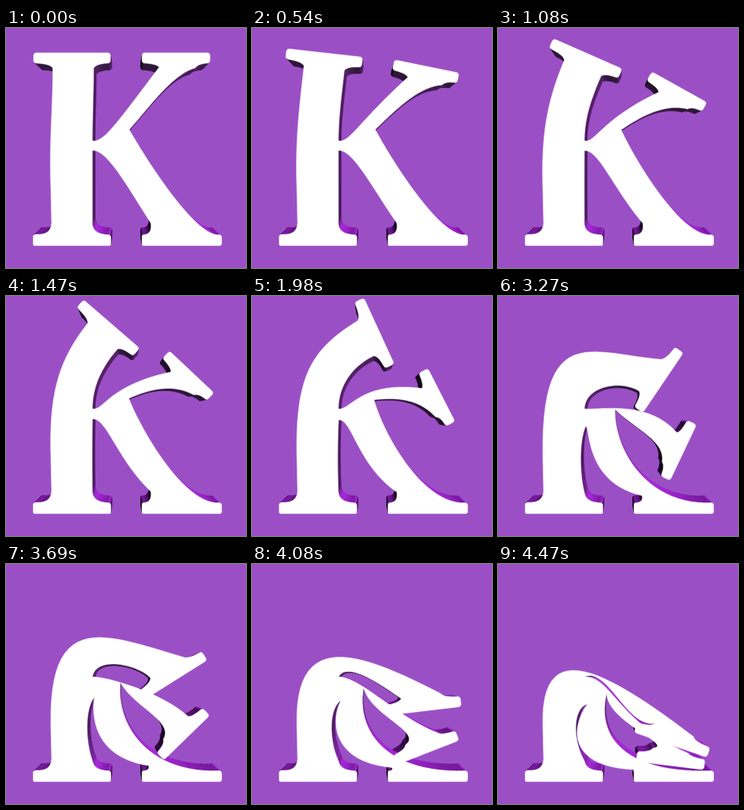
Recreate the animation shown at these times as an HTML page with a canvas. Size 300 px wide and 300 px high, loop 4.5 s.

```html
<!DOCTYPE html>
<html lang="en">
<head>
<meta charset="utf-8">
<title>Bending K</title>
<style>
html, body { margin: 0; width: 100%; height: 100%; overflow: hidden; background: #9b4fc5; }
canvas { display: block; width: 300px; height: 300px; }
</style>
</head>
<body>
<canvas id="stage" width="300" height="300"></canvas>
<script>
const ctx = document.getElementById('stage').getContext('2d');
const LOOP = 4500, STEP = 30;
const VANISH = [150, 150], DEPTH = 0.08;
const { PI, sin, cos, hypot, max, min, round } = Math;
const radians = degrees => degrees * PI / 180;

class Outline {
  constructor(x, y) { this.points = [[x, y]]; }
  line(...points) { this.points.push(...points); return this; }
  cubic(p1, p2, p3, parts = 26) {
    const p0 = this.points[this.points.length - 1];
    for (let i = 1; i <= parts; i++) {
      const t = i / parts, s = 1 - t;
      this.points.push([0, 1].map(c =>
        s * s * s * p0[c] + 3 * s * s * t * p1[c] + 3 * s * t * t * p2[c] + t * t * t * p3[c]));
    }
    return this;
  }
  quad(p1, p2) {
    const p0 = this.points[this.points.length - 1];
    const toward = p => [0, 1].map(c => p[c] + (p1[c] - p[c]) * 2 / 3);
    return this.cubic(toward(p0), toward(p2), p2, 7);
  }
  // Goes around a serif from its left neck to its right neck.
  serif(at, half, left, right) {
    return this.quad(at(left[0] - 3, 14), at(4 - half, 13))
      .quad(at(-half, 13), at(-half, 9)).line(at(-half, 4))
      .quad(at(-half, 0), at(4 - half, 0)).line(at(half - 4, 0))
      .quad(at(half, 0), at(half, 4)).line(at(half, 9))
      .quad(at(half, 13), at(half - 4, 13))
      .quad(at(right[0] + 3, 14), at(...right));
  }
}

// Local axes of a serif: origin at the middle of its outer edge.
function axes(x, y, degrees, scale) {
  const c = cos(radians(degrees)), s = sin(radians(degrees));
  return (u, v) => [x + c * u * scale - s * v, y + s * u * scale + c * v];
}

// The outline for a bend from 0 (upright) to 1 (folded over).
function letter(bend) {
  const b2 = bend ** 2, b3 = bend ** 3, fold = bend ** 8;

  const stemTurn = 199 * bend + 8 * sin(2 * PI * bend);
  const stem = axes(82.5 + 133 * (1 - (1 - bend) ** 2.5), 31 + 195 * bend ** 2.2,
    stemTurn, 1 - 0.07 * sin(PI * bend));
  const lead = bend ** 0.7;
  const arm = axes(212.5 + 2.5 * lead + 24 * sin(PI * lead), 31 + 221 * lead,
    150 * lead + 37 * lead ** 8, 1 - 0.13 * sin(PI * lead));
  const stemNeck = [[-24, 19], [27, 19]], armNeck = [[-21, 18], [24, 19]];

  const neck = stem(...stemNeck[0]);
  const lean = radians(stemTurn * (1 - 0.36 * bend));
  const pull = hypot(neck[0] - 56, neck[1] - 200) * (0.35 + 0.4 * b3);
  const rise = 60 + 50 * bend + 80 * sin(PI * bend ** 1.3) ** 2;

  const crotch = [154 - 18 * b2, 127 + 34 * b2];
  const spread = radians(140 * bend - 48);
  const foot = [181 - 12 * bend ** 6, 244 + 13 * b2];
  const waist = 108 - 15 * b2;

  return new Outline(34, 270)
    .line([34, 261]).quad([34, 258], [38, 258])
    .quad([56, 259], [57, 244]).line([56, 200])
    .cubic([54, 200 - rise], [neck[0] - pull * sin(lean), neck[1] + pull * cos(lean)], neck)
    .serif(stem, 48, ...stemNeck)
    .cubic(stem(27 + 32 * fold, 48 - 46 * fold), [108 + 30 * fold, 112 + 16 * fold], [108, 141])
    .cubic([122 + 20 * b3, 144 - 4 * b3], arm(143 * bend ** 4 - 72, 85 - 40 * b2), arm(...armNeck[0]))
    .serif(arm, 42.5, ...armNeck)
    .cubic(arm(-4, 26), [crotch[0] + 36 * cos(spread), crotch[1] + 36 * sin(spread)], crotch)
    .cubic([crotch[0] + 24 - 38 * bend, crotch[1] + 42 + 14 * bend], [238 - 78 * bend, 262], [267, 258.5])
    .quad([269.5, 259], [269.5, 262]).line([269.5, 270])
    .quad([269, 272], [267, 272]).line([172, 272])
    .quad([170, 272], [170, 270]).line([170, 261])
    .quad([170, 258.5], [min(172, foot[0]), 258.5])
    .quad([foot[0] + 2, 258], foot)
    .cubic([150 - 62 * bend, 195 + 58 * bend], [126 - 36 * b3, 152 + 53 * b3], [108 + 4 * b2, 153 + 22 * b2])
    .cubic([waist, 180], [waist, 220], [108, 246])
    .quad([110, 258], [128, 258.5])
    .quad([131, 259], [131, 262]).line([131, 270])
    .quad([131, 272], [129, 272]).line([36, 272])
    .quad([34, 272], [34, 270])
    .points;
}

const recede = p => [0, 1].map(c => p[c] + (VANISH[c] - p[c]) * DEPTH);

function paint(points, color, width) {
  ctx.beginPath();
  points.forEach(p => ctx.lineTo(p[0], p[1]));
  ctx.closePath();
  ctx.fillStyle = ctx.strokeStyle = color;
  ctx.lineWidth = width;
  ctx.fill();
  ctx.stroke();
}

// Light falls from the upper right; the left stays black.
function sideColor(nx, ny) {
  const right = max(0, nx), up = max(0, -ny) * (0.65 + 0.35 * nx), down = max(0, ny);
  const mix = (base, r, u, d) => round(base + r * right + u * up + d * down);
  return `rgb(${mix(8, 66, 170, 38)},${mix(2, 24, 35, 22)},${mix(10, 82, 225, 46)})`;
}

function draw(time) {
  ctx.fillStyle = '#9b4fc5';
  ctx.fillRect(0, 0, 300, 300);
  ctx.lineJoin = 'round';
  const x = time / (LOOP - STEP);
  const front = letter(x * x * (1.85 - 0.85 * x));
  front.forEach((a, i) => {
    const b = front[(i + 1) % front.length];
    const dx = b[0] - a[0], dy = b[1] - a[1], length = hypot(dx, dy);
    if (length < 0.01) return;
    const facing = dy * (VANISH[0] - a[0]) - dx * (VANISH[1] - a[1]);
    if (facing > 0) paint([a, b, recede(b), recede(a)], sideColor(dy / length, -dx / length), 0.6);
  });
  paint(front, '#fff', 0.5);
}

function tick() {
  const time = performance.now() % LOOP;
  draw(Math.floor(time / STEP) * STEP);
  requestAnimationFrame(tick);
}
tick();
</script>
</body>
</html>
```
